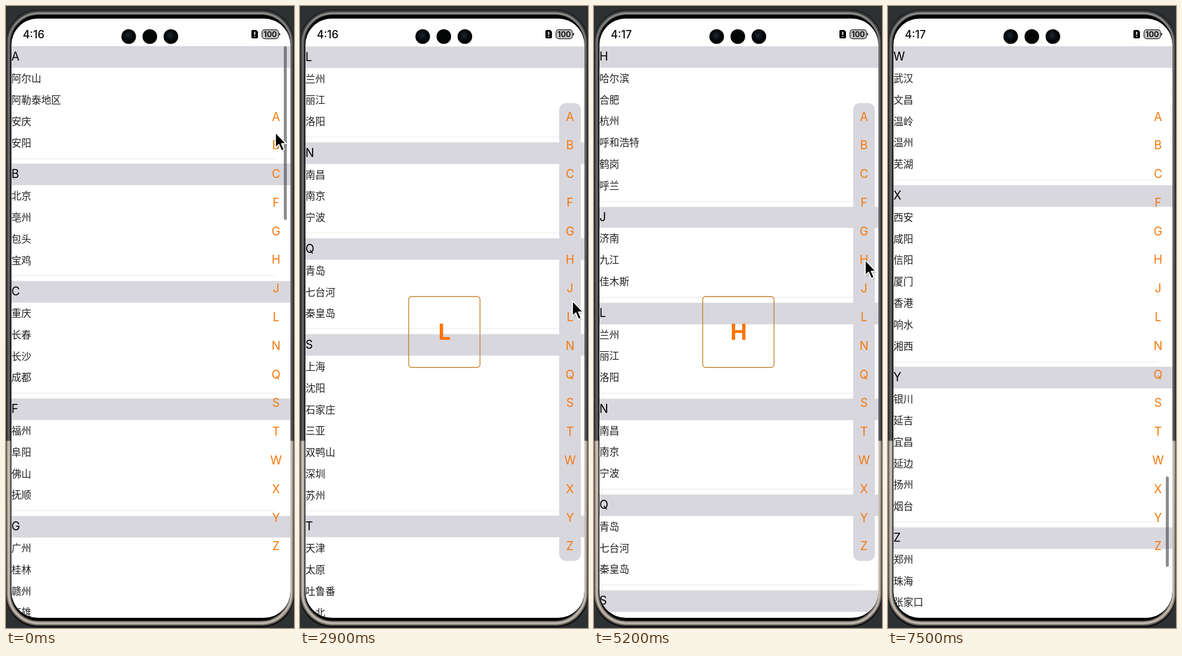
Recreate the animation shown at these times as an HTML page. Size 480x1038 px, loop 7.9 s.

```html
<!DOCTYPE html>
<html lang="zh-CN">
<head>
<meta charset="utf-8">
<title>City index</title>
<style>
html, body { margin: 0; width: 100%; height: 100%; overflow: hidden; background: #2e3133; }
#stage { position: relative; width: 480px; height: 1038px; overflow: hidden; font-family: Inter, "Noto Sans CJK SC", "Noto Sans CJK", sans-serif; }
#stage > svg { position: absolute; left: 0; top: 0; }
#screen { position: absolute; left: 8.5px; top: 21px; width: 465px; height: 1000px; border-radius: 44px; overflow: hidden; background: #fff; }
#view { position: absolute; left: 0; top: 46.3px; width: 100%; bottom: 0; overflow: hidden; }
#list { position: absolute; left: 0; top: 0; width: 100%; }
.group { position: relative; height: calc(var(--rows) * 35.83px + 52.63px); }
.group::after { content: ""; position: absolute; left: 0; bottom: 7.7px; width: 440px; height: 2px; background: #f3f3f3; }
.head, .city { height: 35.83px; line-height: 35.83px; padding-left: .5px; white-space: nowrap; }
.head { background: #d8d7de; color: #000; font-size: 19.5px; }
.city { color: #202020; font-size: 16.6px; font-family: "Noto Sans CJK SC", "Noto Sans CJK", sans-serif; }
#clock { position: absolute; left: 28px; top: 36px; line-height: 24px; font-size: 18px; font-weight: 500; color: #080808; }
#bar { position: absolute; left: 463px; width: 5px; border-radius: 3px; background: rgba(70, 70, 74, .62); }
#panel { position: absolute; left: 432px; top: 162px; width: 36px; height: 764px; border-radius: 11px; background: #d8d7de; }
#index { position: absolute; left: 432px; top: 161.5px; width: 36px; }
#index div { height: 47.8px; line-height: 47.8px; text-align: center; font-size: 19.5px; color: #f5780a; }
#popup rect { fill: none; stroke: #c4852f; stroke-width: 1.4; }
#popup text { font: 700 37px Inter, sans-serif; fill: #ff7300; text-anchor: middle; }
</style>
</head>
<body>
<div id="stage">
  <svg width="480" height="1038">
    <defs>
      <linearGradient id="rim" gradientUnits="userSpaceOnUse" x1="0" y1="0" x2="0" y2="1038">
        <stop offset="0" stop-color="#3c3d3d"/>
        <stop offset=".05" stop-color="#343638"/>
        <stop offset=".698" stop-color="#343638"/>
        <stop offset=".7" stop-color="#938b83"/>
        <stop offset="1" stop-color="#6f6a64"/>
      </linearGradient>
      <linearGradient id="shine" gradientUnits="userSpaceOnUse" x1="0" y1="0" x2="0" y2="1038">
        <stop offset="0" stop-color="#92918e"/>
        <stop offset=".06" stop-color="#6c6d6e"/>
        <stop offset=".698" stop-color="#5a5c5e"/>
        <stop offset=".7" stop-color="#c9bfb4"/>
        <stop offset="1" stop-color="#bfb6ac"/>
      </linearGradient>
    </defs>
    <rect width="480" height="1038" fill="#2e3133"/>
    <rect y="6" width="480" height="1031" rx="54" fill="#101010"/>
    <rect x="4.500" y="11" width="471" height="1019" rx="50" fill="#000" stroke="url(#rim)" stroke-width="8"/>
    <rect x="4.500" y="12" width="471" height="1018" rx="50" fill="none" stroke="url(#shine)" stroke-width="3.500"/>
    <rect x="8" y="16" width="466" height="1008" rx="47" fill="#000"/>
  </svg>
  <div id="screen"><div id="view"><div id="list"></div></div></div>
  <div id="clock"></div>
  <svg width="480" height="70">
    <defs>
      <radialGradient id="lens" cx=".45" cy=".42" r=".5">
        <stop offset="0" stop-color="#1b2935"/>
        <stop offset=".5" stop-color="#0a0f14"/>
        <stop offset=".8" stop-color="#030404"/>
      </radialGradient>
    </defs>
    <circle cx="204.5" cy="51" r="12.2" fill="url(#lens)"/>
    <circle cx="239.7" cy="51" r="12.2" fill="#040505"/>
    <circle cx="274.8" cy="51" r="12.2" fill="url(#lens)"/>
    <path d="M411 40h6l3 3v9q0 2-2 2h-7q-2 0-2-2v-10q0-2 2-2z" fill="#0a0a0a"/>
    <path d="M414.5 43v5M414.5 49.8v1.8" stroke="#fff" stroke-width="1.8"/>
    <rect x="426.6" y="39.6" width="27.6" height="15" rx="4.5" fill="#c4c4c4" stroke="#222" stroke-width="1.2"/>
    <path d="M456 45v4" stroke="#222" stroke-width="1.6"/>
    <text x="440.4" y="51.8" text-anchor="middle" font-family="Inter, sans-serif" font-size="12.5" font-weight="700" fill="#111">100</text>
  </svg>
  <div id="bar"></div>
  <div id="panel"></div>
  <div id="index"></div>
  <svg width="480" height="1038">
    <g id="popup">
      <rect x="181.2" y="484.8" width="118.8" height="118.4" rx="5"/>
      <text id="letter" x="241" y="557"></text>
    </g>
    <g id="cursor">
      <path d="M2 3v25l6-5 4.500 10 4-1.800-4.500-10h8z" fill="#000" opacity=".14"/>
      <path d="M0 0v25.500l5.700-5.300 4.600 10.600 4.400-1.900-4.500-10.300h7.600z" fill="#000" stroke="#fff" stroke-width="1.700" stroke-linejoin="round"/>
    </g>
  </svg>
</div>
<script>
const LOOP = 7900, STEP = 100, ROW = 35.83, EXTRA = 16.8;
const LAG = 200; // the list follows the pointer a little late

const groups = `A 阿尔山 阿勒泰地区 安庆 安阳
B 北京 亳州 包头 宝鸡
C 重庆 长春 长沙 成都
F 福州 阜阳 佛山 抚顺
G 广州 桂林 赣州 高雄
H 哈尔滨 合肥 杭州 呼和浩特 鹤岗 呼兰
J 济南 九江 佳木斯
L 兰州 丽江 洛阳
N 南昌 南京 宁波
Q 青岛 七台河 秦皇岛
S 上海 沈阳 石家庄 三亚 双鸭山 深圳 苏州
T 天津 太原 吐鲁番 台北 台湾 唐山
W 武汉 文昌 温岭 温州 芜湖
X 西安 咸阳 信阳 厦门 香港 响水 湘西
Y 银川 延吉 宜昌 延边 扬州 烟台
Z 郑州 珠海 张家口`.split("\n").map(line => line.split(" "));

// time, x, y of the pointer tip
const path = [
  [0, 449, 211], [300, 452, 236], [600, 455, 283], [900, 459, 328],
  [1200, 460, 372], [1700, 456, 363], [2000, 453, 375], [2400, 454, 440],
  [2700, 454, 512], [2900, 454, 492], [3200, 452, 560], [3500, 453, 612],
  [3800, 453, 605], [4000, 453, 567], [4400, 452, 510], [4700, 452, 445],
  [5000, 452, 418], [5200, 452, 424], [5500, 455, 530], [5700, 459, 600],
  [5900, 461, 637], [6200, 459, 745], [6500, 455, 765], [6800, 450, 880],
  [7200, 440, 1045]
];

// scroll offset, top and length of the scroll bar
const barPath = [[0, 67, 290], [784, 311, 309], [2459, 785, 151]];

const presses = [[300, 1300], [2100, 6500]];
const FADE = 300;

const $ = id => document.getElementById(id);
const clamp = (v, lo, hi) => Math.max(lo, Math.min(hi, v));

function add(parent, className, text) {
  const el = document.createElement("div");
  el.className = className;
  el.textContent = text;
  return parent.appendChild(el);
}

const offsets = [];
let total = 0;
for (const [letter, ...cities] of groups) {
  offsets.push(total);
  total += (cities.length + 1) * ROW + EXTRA;
  const box = add($("list"), "group", "");
  box.style.setProperty("--rows", cities.length);
  add(box, "head", letter);
  cities.forEach(city => add(box, "city", city));
  add($("index"), "", letter);
}

function sample(points, at) {
  const i = points.findIndex(p => p[0] > at);
  if (i < 0) return points[points.length - 1].slice(1);
  const a = points[i - 1], b = points[i];
  const k = (at - a[0]) / (b[0] - a[0]);
  return [a[1] + (b[1] - a[1]) * k, a[2] + (b[2] - a[2]) * k];
}

function selected(t) {
  const u = t - LAG;
  if (u < 100) return 0;
  const y = sample(path, Math.min(u, u < 2000 ? 1200 : 6300))[1];
  return clamp(Math.floor((y - 161.5) / 47.8), 0, groups.length - 1);
}

function pressed(t) {
  return Math.max(...presses.map(([on, off]) => t < on ? 0 : clamp(1 - (t - off) / FADE, 0, 1)));
}

function draw(t) {
  const pick = selected(t), shown = pressed(t);
  const [x, y] = sample(path, t);
  const [top, length] = sample(barPath, offsets[pick]);
  $("list").style.transform = `translateY(${-offsets[pick]}px)`;
  $("clock").textContent = t < 5000 ? "4:16" : "4:17";
  $("bar").style.top = top + "px";
  $("bar").style.height = length + "px";
  $("panel").style.opacity = shown;
  $("popup").style.opacity = shown;
  $("letter").textContent = groups[pick][0];
  $("cursor").setAttribute("transform", `translate(${x} ${y})`);
}

function tick() {
  draw(Math.floor(performance.now() % LOOP / STEP) * STEP);
  requestAnimationFrame(tick);
}
tick();
</script>
</body>
</html>
```
